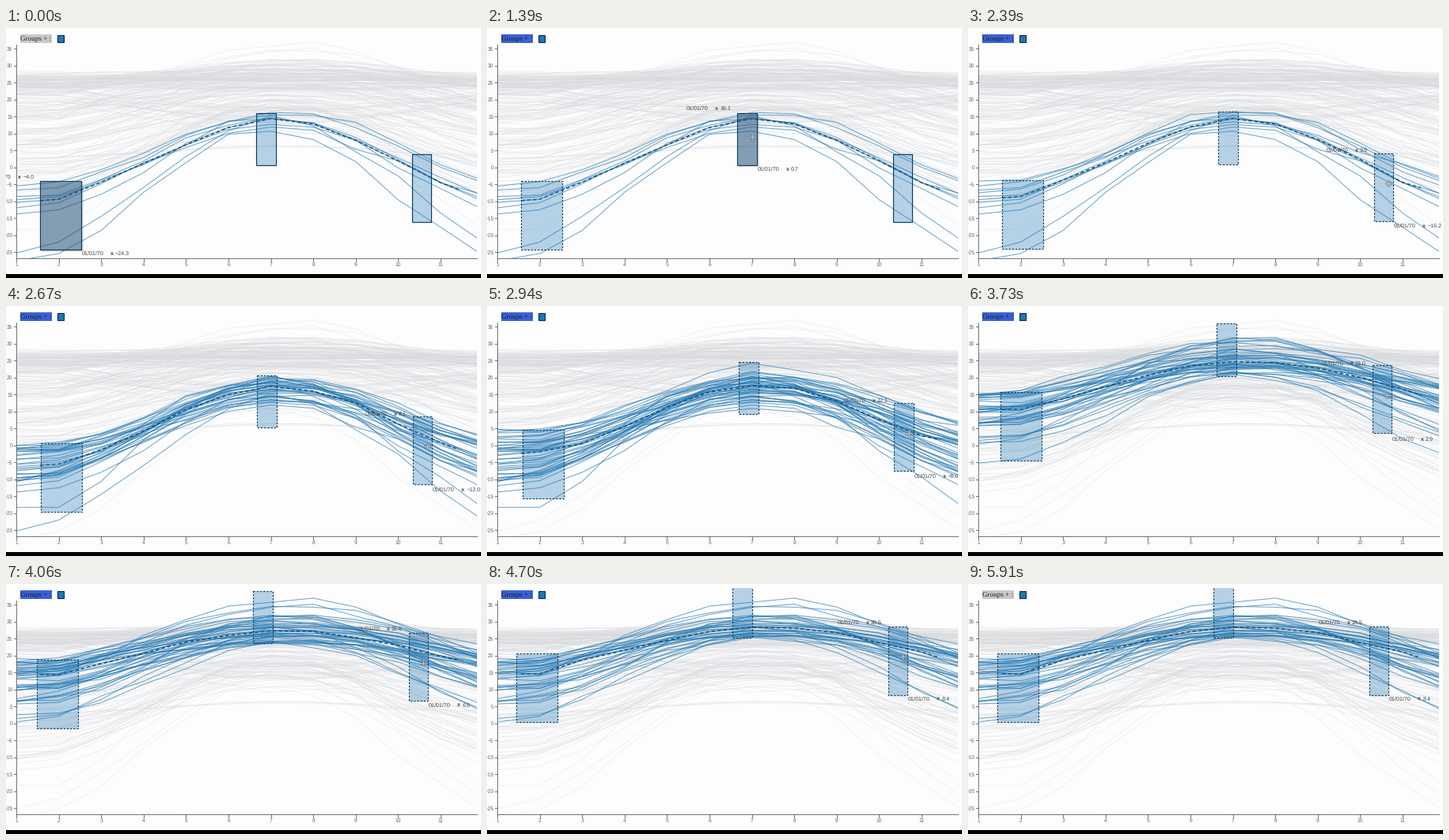
A matplotlib script that plays this animation: 600x317 px, repeating every 5940 ms.

```python
import numpy as np
import matplotlib.pyplot as plt
from matplotlib.animation import FuncAnimation
from matplotlib.collections import LineCollection
from matplotlib.patches import Rectangle
from matplotlib.path import Path

W, H, DPI = 600, 317, 100
STEP, LOOP = 30, 5940
PX = 72 / DPI
X1, DX, Y0, DY = 13, 53.6, 176.8, 4.3
BLUE, NAVY, GREY = "#1f77b4", "#0e3f66", "#666666"
FONT = "Liberation Sans"
plt.rcParams["text.hinting"] = "none"

months = np.arange(1, 13)
rng = np.random.default_rng(12)


def to_x(m):
    return X1 + (np.asarray(m) - 1) * DX


def to_y(v):
    return Y0 - np.asarray(v) * DY


# Selection boxes: left, right (px), top, bottom (value)
BOXES = [(43.2, 95, -4.0, -24.3), (316, 341, 16.1, 0.7), (512.8, 537.2, 3.9, -16.2)]


def seasons(winter, summer):
    """Yearly curves; warmer places peak later and have a longer summer."""
    w, s = (np.asarray(a, float)[:, None] for a in (winter, summer))
    peak = 7.1 + 0.02 * np.clip(w + 9, 0, 15) + rng.normal(0, 0.08, w.shape)
    wave = 0.5 + 0.5 * np.cos(2 * np.pi * (months - peak) / 12)
    wave = wave ** np.clip(1 - 0.025 * w, 0.6, 1)
    noise = rng.normal(0, 1, wave.shape) * (0.2 + 0.014 * np.abs(s - w))
    return w + (s - w) * wave + noise


def spread(n, winter, summer):
    return seasons(rng.uniform(*winter, n), rng.uniform(*summer, n))


def make_stations():
    w = -11 + 30 * rng.random(120) ** 1.4
    s = np.clip(18.5 + 0.5 * w + rng.normal(0, 3.6, w.size), w + 4, 32)
    base = rng.normal(25.6, 1, 65)
    return np.vstack([
        seasons(w, s),
        seasons(base, base + rng.normal(0, 1.3, base.size)),
        spread(10, (-2, 18), (28, 37)),    # deserts
        spread(30, (20, 25), (26, 32)),    # subtropics
        spread(25, (19, 26), (9, 21)),     # southern half
        spread(4, (0, 4), (4, 9)),         # cool coasts
    ])


def make_cold():
    winter = [-5.6, -6.4, -9.4, -10, -10.2, -11.8, -14.2, -24.6, -27, -20]
    summer = [16.4, 16.2, 14.6, 11.8, 13.2, 15.5, 15, 14.5, 11.2, 19]
    return seasons(winter, summer)


def values_at(data, m):
    i = np.floor(m).astype(int) - 1
    f = m - 1 - i
    return data[:, i] * (1 - f) + data[:, i + 1] * f


def selected(data, dx=0.0, dy=0.0):
    """Stations whose curve runs through all three boxes."""
    hit = np.ones(len(data), bool)
    for left, right, top, bottom in BOXES:
        m = 1 + (np.linspace(left, right, 9) + dx - X1) / DX
        v = values_at(data, m)
        rise = dy / DY
        hit &= ((v <= top + rise) & (v >= bottom + rise)).any(axis=1)
    return hit


others = make_stations()
data = np.vstack([others[~selected(others)], make_cold()])
curves = np.stack([np.broadcast_to(to_x(months), data.shape), to_y(data)], axis=2)
middle_m = np.r_[1.56, np.arange(2, 12), 11.43]

# Drag key poses: time, sideways, upwards
POSES = np.array([(2350, 0, 0), (2940, 1.6, 37), (3240, 1.3, 40),
                  (3820, -2.9, 94.5), (4500, -6, 105.8)]).T
CLICKS = [790, 1530, 2010]
DRAG = 2030


def drag(t):
    return tuple(np.interp(t, POSES[0], row) for row in POSES[1:])


def ease(t, a, b):
    u = np.clip((t - a) / (b - a), 0, 1)
    return u * u * (3 - 2 * u)


def pointer(t):
    stops = np.array([[70, 240], [335, 138], [531.4, 198]])
    p = stops[0] + (stops[1] - stops[0]) * ease(t, 820, 1340)
    p = p + (stops[2] - stops[1]) * ease(t, 1550, 1960)
    dx, dy = drag(t)
    return p[0] + dx, p[1] - dy


fig = plt.figure(figsize=(W / DPI, H / DPI), dpi=DPI, facecolor="#fdfdfe")
ax = fig.add_axes([0, 0, 1, 1])
ax.set_xlim(0, W)
ax.set_ylim(H, 0)
ax.axis("off")


def rect(x, y, w, h, **kw):
    return ax.add_patch(Rectangle((x, y), w, h, **kw))


def text(x, y, s, size, **kw):
    kw = {"family": FONT, "color": "#444444", "va": "center_baseline", **kw}
    return ax.text(x, y, s, fontsize=size * PX, **kw)


plot_area = rect(13, 5, 582, 287, fc="none", ec="none")
label_area = rect(0, 0, 595, 317, fc="none", ec="none")


def clipped(artist, area=plot_area):
    artist.set_clip_path(area)
    return artist


clipped(ax.add_collection(LineCollection(
    curves, colors="#d9dbde", linewidths=0.8 * PX, alpha=0.4, zorder=1)))
picked = LineCollection([], colors=BLUE, linewidths=1.0 * PX, alpha=0.62, zorder=2)
clipped(ax.add_collection(picked))
middle, = ax.plot([], [], color="#14507f", lw=1.5 * PX, dashes=(3, 2), zorder=3)

# Axes
axis_style = dict(color=GREY, lw=0.9 * PX, zorder=6)
ax.plot([13, 13], [21, 292], **axis_style)
ax.plot([13, 595], [292, 292], **axis_style)
for v in range(-25, 40, 5):
    y = float(to_y(v))
    ax.plot([9.5, 13], [y, y], **axis_style)
    text(8.5, y, str(v).replace("-", "\u2212"), 6.6, ha="right", color=GREY)
for m in range(1, 12):
    x = float(to_x(m))
    ax.plot([x, x], [292, 296], **axis_style)
    text(x, 299.5, str(m), 6.6, ha="center", color=GREY)
rect(0, 311.5, W, 6, fc="black", ec="none", zorder=9)

# Header
mark = rect(18, 7.5, 40, 11, fc="#c9c9c9", ec="none", zorder=6)
text(18, 13, "Groups + :", 9.2, family="Liberation Serif", color="#1c1c24", zorder=7)
rect(64.5, 9, 8.5, 8.5, fc=BLUE, ec="#0b2a44", lw=1.1 * PX, zorder=7)

shadows = [clipped(rect(0, 0, 1, 1, fc="#333333", ec="none", alpha=0.1, zorder=3.5))
           for _ in range(2)]
panes = [clipped(rect(0, 0, 1, 1, lw=1.2 * PX, zorder=4)) for _ in BOXES]


def make_label():
    return [clipped(text(0, 0, s, 7.2, weight=wt, zorder=8), label_area)
            for s, wt in (("01/01/70", "normal"), ("x", "bold"), ("", "normal"))]


upper, lower = make_label(), make_label()


def place(label, x, y, value):
    for part, dx in zip(label, (0, 36.3, 42.3)):
        part.set_position((x + dx, y))
        part.set_visible(True)
    label[2].set_text(value)


def fmt(v):
    return f"{v:.1f}".replace("-", "\u2212")


def text_width(s):
    return 7.2 * sum(0.278 if c == "." else 0.584 if c == "\u2212" else 0.556 for c in s)


# Four-way move pointer
arm = np.array([[-.7, .7], [-.7, 3], [-2, 3], [0, 5], [2, 3], [.7, 3]])
cross = np.vstack([arm @ np.array([[c, -s], [s, c]])
                   for c, s in ((1, 0), (0, 1), (-1, 0), (0, -1))])
cursor, = ax.plot([], [], marker=Path(np.vstack([cross, cross[:1]]), closed=True),
                  ms=9 * PX, mfc="#e8eef2", mec="#51646f", mew=0.6 * PX,
                  alpha=0.8, zorder=9)


def show_labels(k, t):
    left, right, top, bottom = BOXES[k]
    dx, dy = drag(t - STEP)
    side = drag(t)[0]
    rise = dy / DY
    high, low = fmt(top + rise), fmt(bottom + rise)
    place(upper, left + side - 50 - text_width(high), to_y(top) - dy - 5.8, high)
    place(lower, right + side + 0.8, to_y(bottom) - dy + 4.3, low)


def draw(i):
    t = i * STEP
    dx, dy = drag(t)
    px, py = pointer(t)

    hit = selected(data, dx, dy)
    picked.set_segments(curves[hit])
    middle.set_data(to_x(middle_m), to_y(np.median(values_at(data[hit], middle_m), axis=0)))

    for part in upper + lower + shadows:
        part.set_visible(False)
    for k, (left, right, top, bottom) in enumerate(BOXES):
        y, h = to_y(top) - dy, (top - bottom) * DY
        x, w = left + dx, right - left
        over = x <= px <= x + w and y <= py <= y + h
        dark = over and t < DRAG
        pane = panes[k]
        pane.set_bounds(x, y, w, h)
        pane.set_facecolor(("#1f5a8a", 0.45) if dark else (BLUE, 0.32))
        pane.set_edgecolor(NAVY)
        pane.set_linestyle((0, (2, 1.5)) if t >= CLICKS[k] else "-")
        if dark:
            for n, shade in enumerate(shadows, 1):
                shade.set_bounds(x + n, y + n, w + 0.5, h + 0.5)
                shade.set_visible(True)
        if dark or (k == 2 and t >= DRAG):
            show_labels(k, t)

    mark.set_facecolor("#3a62d6" if CLICKS[0] <= t < 5850 else "#c9c9c9")
    cursor.set_data([px], [py])
    cursor.set_visible(760 <= t < 5150)
    return []


anim = FuncAnimation(fig, draw, frames=LOOP // STEP, interval=STEP,
                     init_func=lambda: draw(0), repeat=True, blit=False)
plt.show()
```
